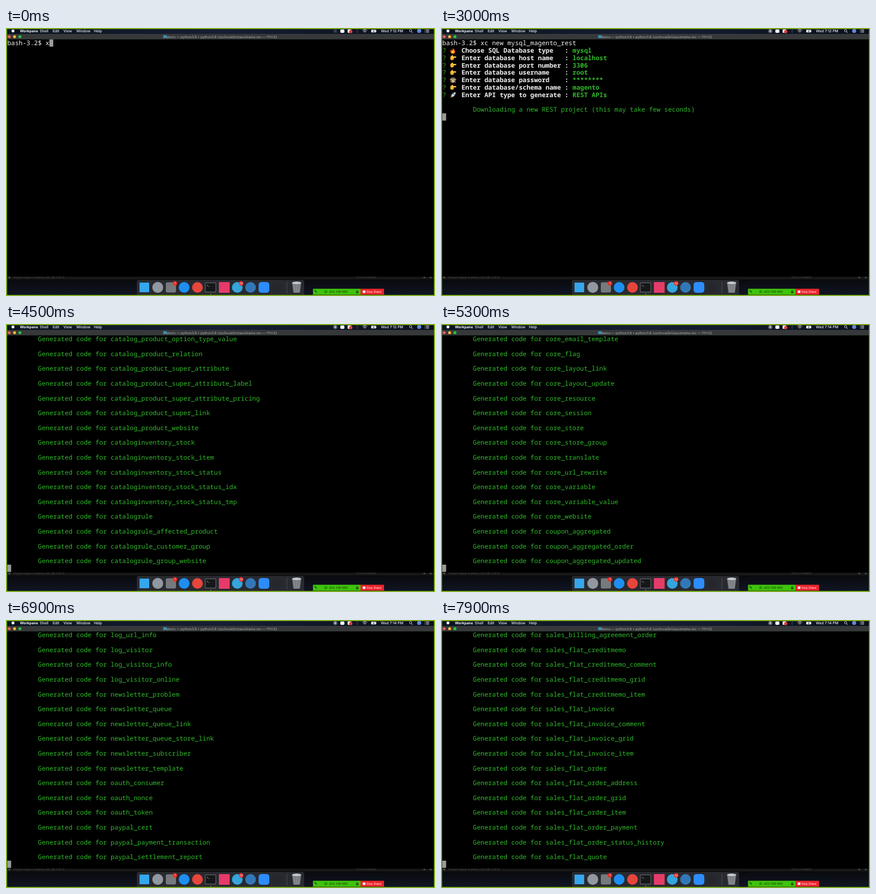
These frames come from a looping animation (800 by 500 pixels, 8000 ms). An HTML page with a canvas:

```html
<!DOCTYPE html>
<html lang="en">
<head>
<meta charset="utf-8">
<title>Code generator session</title>
<style>
html, body { margin: 0; width: 100%; height: 100%; overflow: hidden; background: #000; }
canvas { display: block; }
</style>
</head>
<body>
<canvas id="stage" width="800" height="500"></canvas>
<script>
const ctx = document.getElementById('stage').getContext('2d');
const LOOP = 8000, STEP = 100;
const LEFT = 2.4, TOP = 21.2, COL = 7.145, ROW = 13.8, ROWS = 32;
const GREEN = '#30b92a', WHITE = '#f2f2f2';
const MONO = '"Noto Sans Mono", "DejaVu Sans Mono", monospace';
const SANS = 'Inter, Roboto, sans-serif';

const command = 'xc new mysql_magento_rest';
const questions = [
  ['flame', 'Choose SQL Database type', 'mysql'],
  ['hand', 'Enter database host name', 'localhost'],
  ['hand', 'Enter database port number', '3306'],
  ['hand', 'Enter database username', 'root'],
  ['monkey', 'Enter database password', '********'],
  ['hand', 'Enter database/schema name', 'magento'],
  ['rocket', 'Enter API type to generate', 'REST APIs']
];

// Each line: a prefix, then its endings; "." means the bare prefix.
const tables = `
admin_ assert role rule user
adminnotification_ inbox
api2_acl_ attribute role rule user
api_ assert role rule session user
captcha_ log
catalog_category_ anc_categs_index_idx anc_categs_index_tmp anc_products_index_idx anc_products_index_tmp
catalog_category_entity . _datetime _decimal _int _text _varchar
catalog_category_product . _index _index_enbl_idx _index_enbl_tmp _index_idx _index_tmp
catalog_ compare_item eav_attribute
catalog_product_bundle_ option option_value price_index selection selection_price stock_index
catalog_product_ enabled_index
catalog_product_entity . _datetime _decimal _gallery _group_price _int _media_gallery _media_gallery_value _text _tier_price _varchar
catalog_product_index_ eav eav_decimal eav_idx eav_tmp group_price price price_idx price_tmp tier_price website
catalog_product_link . _attribute _attribute_decimal _attribute_int _attribute_varchar _type
catalog_product_option . _price _title _type_price _type_title _type_value
catalog_product_ relation super_attribute super_attribute_label super_attribute_pricing super_link website
cataloginventory_stock . _item _status _status_idx _status_tmp
catalogrule . _affected_product _customer_group _group_website _product _product_price _website
catalogsearch_ fulltext query result
checkout_agreement . _store
cms_ block block_store page page_store
core_ cache cache_option cache_tag config_data email_queue email_queue_recipients email_template flag layout_link layout_update resource session store store_group translate url_rewrite variable variable_value website
coupon_aggregated . _order _updated
cron_ schedule
customer_address_entity . _datetime _decimal _int _text _varchar
customer_ eav_attribute eav_attribute_website
customer_entity . _datetime _decimal _int _text _varchar
customer_ flowpassword form_attribute group
dataflow_ batch batch_export batch_import import_data profile profile_history session
design_ change
directory_ country country_format country_region country_region_name currency_rate
downloadable_ link link_price link_purchased link_purchased_item link_title sample sample_title
eav_attribute . _group _label _option _option_value _set
eav_entity . _attribute _datetime _decimal _int _store _text _type _varchar
eav_form_ element fieldset fieldset_label type type_entity
gift_ message
importexport_ importdata
index_ event process process_event
log_ customer quote summary summary_type url url_info visitor visitor_info visitor_online
newsletter_ problem queue queue_link queue_store_link subscriber template
oauth_ consumer nonce token
paypal_ cert payment_transaction settlement_report settlement_report_row
permission_ block variable
persistent_ session
poll . _answer _store _vote
product_alert_ price stock
rating . _entity _option _option_vote _option_vote_aggregated _store _title
report_ compared_product_index event event_types viewed_product_aggregated_daily viewed_product_aggregated_monthly viewed_product_aggregated_yearly viewed_product_index
review . _detail _entity _entity_summary _status _store
sales_bestsellers_aggregated_ daily monthly yearly
sales_billing_agreement . _order
sales_flat_creditmemo . _comment _grid _item
sales_flat_invoice . _comment _grid _item
sales_flat_order . _address _grid _item _payment _status_history
sales_flat_quote .
`.trim().split('\n').flatMap(line => {
  const [prefix, ...ends] = line.split(' ');
  return ends.map(end => end === '.' ? prefix : prefix + end);
});

const progress = [
  [3000, 0],
  ...[[4500, 'catalogrule_group_website'], [5300, 'coupon_aggregated_updated'],
    [6900, 'paypal_settlement_report'], [7900, 'sales_flat_quote']]
    .map(([time, name]) => [time, tables.indexOf(name) + 1])
];

function generatedCount(t) {
  if (t <= 3000) return 0;
  const i = progress.findIndex(p => t <= p[0]);
  const [t0, n0] = progress[i - 1], [t1, n1] = progress[i];
  return Math.round(n0 + (n1 - n0) * (t - t0) / (t1 - t0));
}

function rect(x, y, w, h, color, r = 0) {
  ctx.fillStyle = color;
  ctx.beginPath();
  ctx.roundRect(x, y, w, h, r);
  ctx.fill();
}

function disc(x, y, r, color) {
  ctx.fillStyle = color;
  ctx.beginPath();
  ctx.arc(x, y, r, 0, 7);
  ctx.fill();
}

function stroke(path, color, width = 0.8) {
  ctx.strokeStyle = color;
  ctx.lineWidth = width;
  ctx.stroke(new Path2D(path));
}

function fillPath(path, color) {
  ctx.fillStyle = color;
  ctx.fill(new Path2D(path));
}

function label(text, x, y, size, color, weight = 400, align = 'left') {
  ctx.font = `${weight} ${size}px ${SANS}`;
  ctx.textAlign = align;
  ctx.fillStyle = color;
  ctx.fillText(text, x, y);
}

function cells(text, col, row, color, weight = 400) {
  ctx.font = `${weight} ${COL / 0.6}px ${MONO}`;
  ctx.textAlign = 'left';
  ctx.fillStyle = color;
  ctx.fillText(text, LEFT + col * COL, TOP + row * ROW + 10.9);
}

const emoji = {
  flame() {
    fillPath('M-1-6C0-3 5-1 4 3C3 7-4 7-5 2C-5 0-4-1-3-2L-2 0C0-2 0-4-1-6Z', '#f4511e');
    fillPath('M0-1C1 1 3 2 2 4C1 6-3 6-3 3C-3 2-1 1 0-1Z', '#ffca28');
  },
  hand() {
    rect(-5, -3.5, 6.5, 7.5, '#f5b82e', 2.5);
    rect(-1, -2.6, 7, 2.5, '#ffc83d', 1.2);
    rect(-2.5, -5, 2.3, 4, '#ffc83d', 1);
    stroke('M-1 1H1.5M-1 2.6H1', '#c98616', 0.6);
  },
  monkey() {
    disc(-4.5, -1, 1.6, '#9b7653');
    disc(4.5, -1, 1.6, '#9b7653');
    disc(0, -0.5, 4.6, '#80624b');
    disc(0, 2.2, 2.8, '#cdb79f');
    rect(-4.5, -2.5, 4, 3, '#b8a088', 1);
    rect(0.5, -2.5, 4, 3, '#b8a088', 1);
    rect(-5, 0, 2.2, 5.5, '#74563f', 1);
    rect(2.8, 0, 2.2, 5.5, '#74563f', 1);
  },
  rocket() {
    fillPath('M-2-1L-5 1L-2 2ZM1 2L0 5L3 1Z', '#e53935');
    fillPath('M5-5C1-5-2-2-3 2L-1 4C3 2 5-1 5-5Z', '#cfd8dc');
    fillPath('M-3 2L-5 5L-1 4Z', '#ffa726');
    disc(1.5, -1.5, 1.3, '#2684c9');
  }
};

function drawSession(t) {
  const rows = [];
  const typed = Math.min(command.length, 1 + 2 * Math.floor(t / 100));
  const input = 'bash-3.2$ ' + command.slice(0, typed);
  let cursorCol = input.length;
  rows.push(row => cells(input, 0, row, WHITE));

  if (t >= 1400) cursorCol = 0;
  questions.forEach(([icon, text, answer], i) => {
    const age = t - 1600 - i * 200;
    if (age < 0) return;
    const shown = answer.slice(0, Math.ceil(answer.length * age / 100));
    rows.push(row => {
      cells('?', 0, row, GREEN);
      ctx.save();
      ctx.translate(LEFT + 20, TOP + (row + 0.5) * ROW);
      emoji[icon]();
      ctx.restore();
      cells(text.padEnd(27) + ':', 5, row, WHITE, 700);
      cells(shown, 34, row, GREEN, 700);
    });
    cursorCol = age < 200 ? 34 + shown.length : 0;
  });

  const message = text => rows.push(null, row => cells(text, 8, row, GREEN));
  if (t >= 3000) {
    message('Downloading a new REST project (this may take few seconds)');
    tables.slice(0, generatedCount(t)).forEach(name => message('Generated code for ' + name));
  }

  const cursorRow = rows.length - (cursorCol ? 1 : 0);
  const scroll = Math.max(0, cursorRow - ROWS + 1);
  rows.slice(scroll).forEach((draw, row) => draw && draw(row));
  rect(LEFT + cursorCol * COL, TOP + (cursorRow - scroll) * ROW, COL, ROW - 0.3, '#9c9c9c');
}

function drawMenuBar(t) {
  const sky = ctx.createLinearGradient(0, 0, 800, 0);
  sky.addColorStop(0, '#0a1420');
  sky.addColorStop(0.5, '#171e32');
  sky.addColorStop(1, '#0a101c');
  rect(0, 0, 800, 11, sky);
  disc(13, 5.5, 2.7, '#f4f4f4');
  label('Workpane', 26, 8, 6.7, '#fff', 700);
  [['Shell', 63], ['Edit', 87], ['View', 107], ['Window', 131], ['Help', 164]]
    .forEach(([text, x]) => label(text, x, 8, 6.8, '#f4f4f4', 500));

  const record = t < 500 ? '#555b66' : '#f4f4f4';
  ctx.beginPath();
  ctx.arc(614, 5.7, 3.1, 0, 7);
  ctx.strokeStyle = record;
  ctx.lineWidth = 0.7;
  ctx.stroke();
  disc(614, 5.7, 1.6, record);
  rect(623.5, 2.7, 7.5, 6.2, '#fff', 1.6);
  rect(637, 2.5, 7, 6.5, '#eee', 1.2);
  disc(643, 6.8, 3, '#e53935');
  stroke('M653 4L657 7.5L655 9.5V2L657 4L653 7.5', '#3c434f', 0.6);
  stroke('M664.5 4.5Q669 0.8 673.5 4.5M666 6.2Q669 3.7 672 6.2M667.5 7.7Q669 6.5 670.5 7.7', '#eee', 0.9);
  rect(681, 3.2, 9, 5, '#e8e8e8', 1);
  rect(690.4, 4.8, 0.9, 1.8, '#e8e8e8');
  stroke('M686.5 3.5L684.5 6H687L685 8', '#222', 0.7);
  label(`Wed 7:${t < 4900 ? 12 : 14} PM`, 720, 8, 6.8, '#f4f4f4', 500, 'center');
  ctx.beginPath();
  ctx.arc(754.5, 5, 2.2, 0, 7);
  ctx.strokeStyle = '#eee';
  ctx.lineWidth = 0.8;
  ctx.stroke();
  stroke('M756 6.6L758.5 9', '#eee', 0.9);
  disc(770.5, 5.5, 3.8, '#6488d8');
  stroke('M781 3.5H782M783.2 3.5H789M781 5.7H782M783.2 5.7H789M781 7.9H782M783.2 7.9H789', '#eee', 0.9);
}

function drawTitleBar() {
  rect(2, 11, 796, 10.2, '#37383a');
  ['#f95c57', '#fdbc2f', '#2bc840'].forEach((color, i) => disc(6 + i * 10, 16.2, 2.7, color));
  rect(293, 13.5, 7, 5.2, '#3f8fae', 0.8);
  label('demo — python3.8 • python3.8 /usr/local/bin/asciinema rec — 111×32',
    402.5, 18.5, 6.25, '#b2b2b2', 400, 'center');
}

function badge(x, y, text) {
  disc(x, y, 4.2, '#e9302d');
  label(text, x, y + 1.7, 4.6, '#fff', 400, 'center');
}

function drawDock() {
  rect(2, 464, 796, 6, '#161718');
  label('Project output  8 entries, 200 KB, UTF-8', 14, 466.5, 5, '#4d4d4d');
  label('2024 of 4096M', 653, 466.5, 5, '#484848');
  disc(6, 465.5, 2, '#4d4d4d');
  disc(780, 465.5, 1.6, '#555');
  disc(792, 465.5, 1.6, '#555');
  const floor = ctx.createLinearGradient(0, 469, 0, 498);
  floor.addColorStop(0, '#090a0e');
  floor.addColorStop(1, '#101522');
  rect(2, 469, 796, 29, floor);
  rect(244, 470, 312, 30, '#282a30', 4);

  rect(249, 475, 18, 18, '#36a6ec', 1);
  disc(283, 484, 10.2, '#9298a0');
  rect(298, 474.5, 19, 19, '#777a7d', 3);
  disc(332.2, 484, 10, '#1e8ff0');
  disc(357, 484, 10, '#e6453b');
  rect(371.5, 475, 20, 18, '#8a8d8f', 1.5);
  rect(372.2, 475.7, 18.6, 16.6, '#151719', 1);
  label('>_', 374, 481.5, 5, '#e8e8e8');
  rect(397, 474, 20, 20, '#e63b68');
  disc(431.3, 484, 10, '#35a5dc');
  disc(456, 484, 10, '#3278b8');
  rect(471, 474, 20, 20, '#2d8cff', 5);
  disc(505.5, 484, 10, '#25272f');
  rect(523.5, 473, 0.8, 22, '#555860');
  badge(315, 476.5, '1');
  badge(438.5, 476.5, '24');

  fillPath('M533.5 475H550.5L548 494H536Z', '#777c80');
  ctx.beginPath();
  ctx.ellipse(542, 475.5, 8.5, 2.5, 0, 0, 7);
  ctx.fillStyle = '#c4c7c9';
  ctx.fill();
  stroke('M537 479L539 493M542 479V493M547 479L545 493', '#a0a5a8', 0.7);
  disc(382, 496.5, 0.8, '#bbb');
}

function drawShareBar() {
  rect(572.5, 486.5, 89, 11, '#3fc30c', 1);
  rect(661, 486.5, 44, 11, '#ea252d', 1);
  stroke('M579 494.5V492Q579 490.5 576 490.5M577.5 489L575.5 490.5L577.5 492', '#153b08', 1);
  label('ID: 402-518-663', 615.5, 494.1, 5.6, '#102e05', 400, 'center');
  rect(652.7, 491.2, 4.6, 3.6, '#1c5607', 0.5);
  stroke('M653.6 491.3V490Q655 488.2 656.4 490V491.3', '#1c5607', 0.8);
  rect(665.5, 489.7, 4.6, 4.6, '#fff', 0.5);
  label('Stop Share', 672, 494.1, 5.4, '#fff');
}

function draw(t) {
  ctx.textRendering = 'geometricPrecision';
  rect(0, 0, 800, 500, '#000');
  drawSession(t);
  drawMenuBar(t);
  drawTitleBar();
  drawDock();
  ctx.strokeStyle = '#80b01f';
  ctx.lineWidth = 2;
  ctx.strokeRect(1, 1, 798, 498);
  drawShareBar();
}

let last = -1;
const start = performance.now();
function tick() {
  const t = Math.floor((performance.now() - start) % LOOP / STEP) * STEP;
  if (t !== last) draw(last = t);
  requestAnimationFrame(tick);
}
tick();
</script>
</body>
</html>
```
